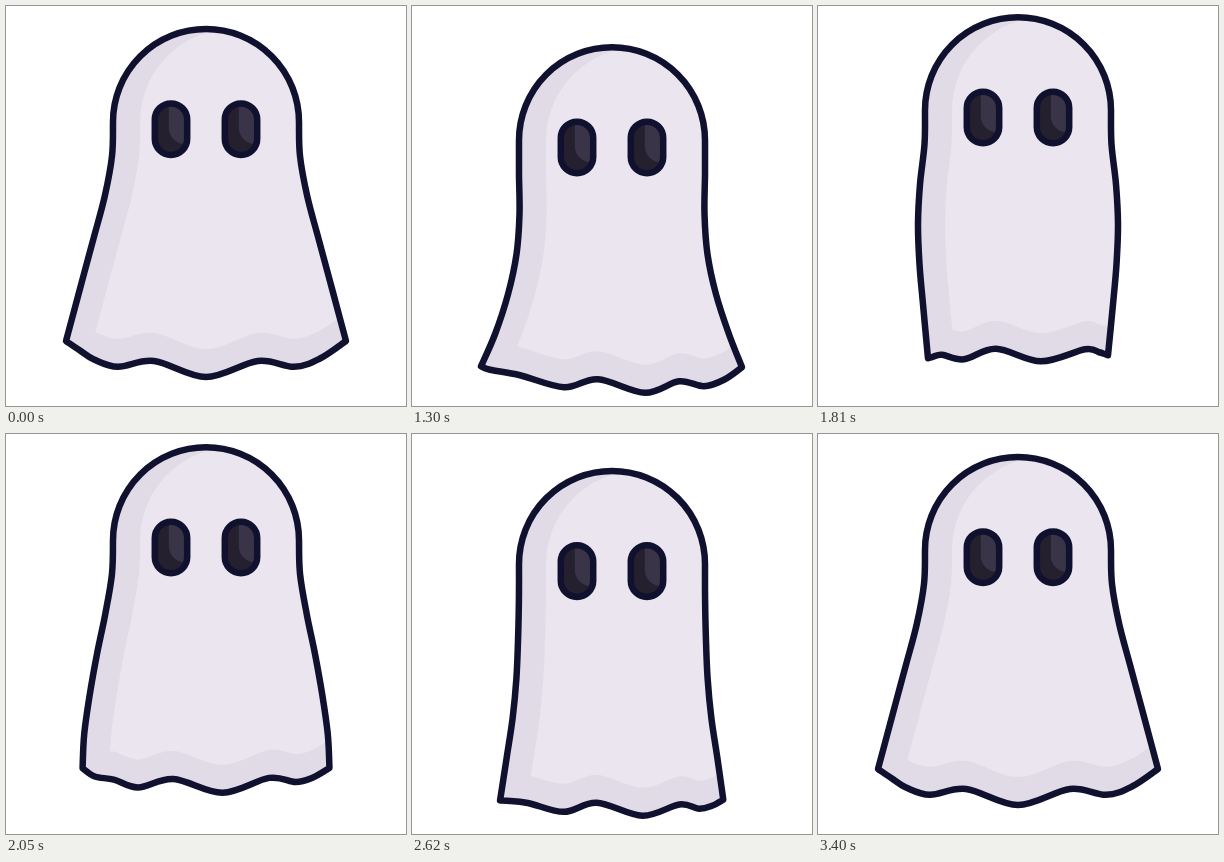
Recreate the animation shown at these times as an HTML page with a canvas. Size 400 px wide and 400 px high, loop 3.43 s.

```html
<!DOCTYPE html>
<html lang="en">
<head>
<meta charset="utf-8">
<title>Ghost</title>
<style>
  html, body { margin: 0; width: 100%; height: 100%; overflow: hidden; background: #fff; }
  canvas { display: block; width: 100vmin; height: 100vmin; }
</style>
</head>
<body>
<canvas id="stage"></canvas>
<script>
const LOOP = 3430, REST = 1030, STEP = 30, SIZE = 400;
const LINE = '#10112f', LIGHT = '#eae5ee', SHADE = '#e0dbe6', EYE = '#25202d', GLINT = '#393447';

const canvas = document.getElementById('stage');
const ctx = canvas.getContext('2d');
const scale = Math.max(1, window.devicePixelRatio || 1);
canvas.width = canvas.height = SIZE * scale;

// Each pose: x of the left side at SIDE_Y, then the hem from left to right as x, y pairs.
const SIDE_Y = [150, 190, 230, 270, 310];
const wide = [106, 98.8, 88.2, 77.4, 66.7,
  60, 335, 74, 344.5, 88, 353.5, 112, 360.8, 148, 355, 200, 371, 252, 355, 288, 360.8, 314, 352.5, 340, 335];
const drop = [107, 107.5, 104.5, 96, 83,
  69, 342, 78, 345.5, 108, 351, 152, 363, 186, 355, 233, 368.5, 267, 357, 292, 362, 312, 355.5, 330, 343];
const slim = [106.5, 102, 100, 101.5, 105,
  110, 364, 115, 362.5, 124, 360.5, 146, 365, 178, 354.5, 223, 367, 267, 355, 281, 358, 286, 359.5, 290, 361];
const bulge = [106, 100.5, 96, 94.3, 95.5,
  100, 357, 109, 362, 132, 358, 157, 366, 191, 354.5, 236, 365.5, 276, 352.5, 290, 354.5, 295, 355.5, 300, 356];
const mix = (a, b, k) => a.map((v, i) => v + (b[i] - v) * k);

const poses = [
  [1030, wide], [1300, drop], [1810, slim], [1870, bulge], [2200, wide],
  [2290, mix(wide, drop, 0.2)], [2410, drop], [2890, slim], [2950, bulge], [3280, wide], [3400, wide]
];
const lift = [[1030, 0], [1360, 20], [1915, -15], [2465, 20], [2980, -8], [3380, 0]];
const blink = [[2900, 1], [3010, 0.12], [3130, 1]];

// Eased value between keys, held outside them.
function ease(keys, t) {
  const i = keys.findIndex(k => k[0] > t);
  if (i < 0) return keys[keys.length - 1][1];
  if (i === 0) return keys[0][1];
  const [t0, a] = keys[i - 1], [t1, b] = keys[i];
  const u = (t - t0) / (t1 - t0);
  return a + (b - a) * u * u * (3 - 2 * u);
}

// Hermite blend of the poses, so the cloth keeps moving through each one.
function poseAt(t) {
  const i = poses.findIndex(p => p[0] > t);
  if (i < 1) return wide;
  const slope = (j, c) => {
    const p = poses[j - 1], n = poses[j + 1];
    return p && n ? (n[1][c] - p[1][c]) / (n[0] - p[0]) : 0;
  };
  const [t0, a] = poses[i - 1], [t1, b] = poses[i];
  const h = t1 - t0, u = (t - t0) / h, v = 1 - u;
  return a.map((x, c) =>
    x * v * v * (1 + 2 * u) + b[c] * u * u * (3 - 2 * u) +
    h * u * v * (slope(i - 1, c) * v - slope(i, c) * u));
}

// Smooth curve through points from the first to the last.
function curve(path, pts, before = pts[0], after = pts[pts.length - 1]) {
  const p = [before, ...pts, after];
  for (let i = 1; i < p.length - 2; i++) {
    const [a, b, c, d] = p.slice(i - 1, i + 3);
    path.bezierCurveTo(
      b[0] + (c[0] - a[0]) / 6, b[1] + (c[1] - a[1]) / 6,
      c[0] - (d[0] - b[0]) / 6, c[1] - (d[1] - b[1]) / 6, c[0], c[1]);
  }
}

function bodyPath(pose) {
  const n = SIDE_Y.length, hem = [];
  for (let i = n; i < pose.length; i += 2) hem.push([pose[i], pose[i + 1]]);
  const left = [[107, 116], ...SIDE_Y.map((y, i) => [pose[i], y])];
  const right = left.map(([x, y]) => [SIZE - x, y]);
  const path = new Path2D();
  path.arc(200, 116, 93, Math.PI, 0);
  curve(path, [...right, hem[hem.length - 1]], [293, 82]);
  curve(path, hem.slice().reverse());
  curve(path, [hem[0], ...left.reverse()], undefined, [107, 82]);
  path.closePath();
  return path;
}

function eyePath(x, open) {
  const r = 16.2, ry = r * open, h = 9.6 * open, y = 123.2;
  const path = new Path2D();
  path.ellipse(x, y - h, r, ry, 0, Math.PI, 0);
  path.ellipse(x, y + h, r, ry, 0, 0, Math.PI);
  path.closePath();
  return path;
}

function outline(path) {
  ctx.strokeStyle = LINE;
  ctx.lineWidth = 6.5;
  ctx.lineJoin = 'round';
  ctx.stroke(path);
}

function draw(t) {
  ctx.setTransform(scale, 0, 0, scale, 0, 0);
  ctx.fillStyle = '#fff';
  ctx.fillRect(0, 0, SIZE, SIZE);
  ctx.translate(0, ease(lift, t));

  const body = bodyPath(poseAt(t));
  ctx.fillStyle = SHADE;
  ctx.fill(body);
  ctx.save();
  ctx.clip(body);
  ctx.translate(27, 0);
  ctx.clip(body);
  ctx.translate(-27, -28);
  ctx.fillStyle = LIGHT;
  ctx.fill(body);
  ctx.restore();
  outline(body);

  const open = ease(blink, t);
  for (const x of [165, 235]) {
    const eye = eyePath(x, open);
    ctx.fillStyle = EYE;
    ctx.fill(eye);
    ctx.save();
    ctx.clip(eye);
    ctx.translate(14, -11 * open);
    ctx.fillStyle = GLINT;
    ctx.fill(eye);
    ctx.restore();
    outline(eye);
  }
}

function frame() {
  const t = performance.now() % LOOP;
  draw(t < REST ? 0 : REST + Math.floor((t - REST) / STEP) * STEP);
  requestAnimationFrame(frame);
}
frame();
</script>
</body>
</html>
```
